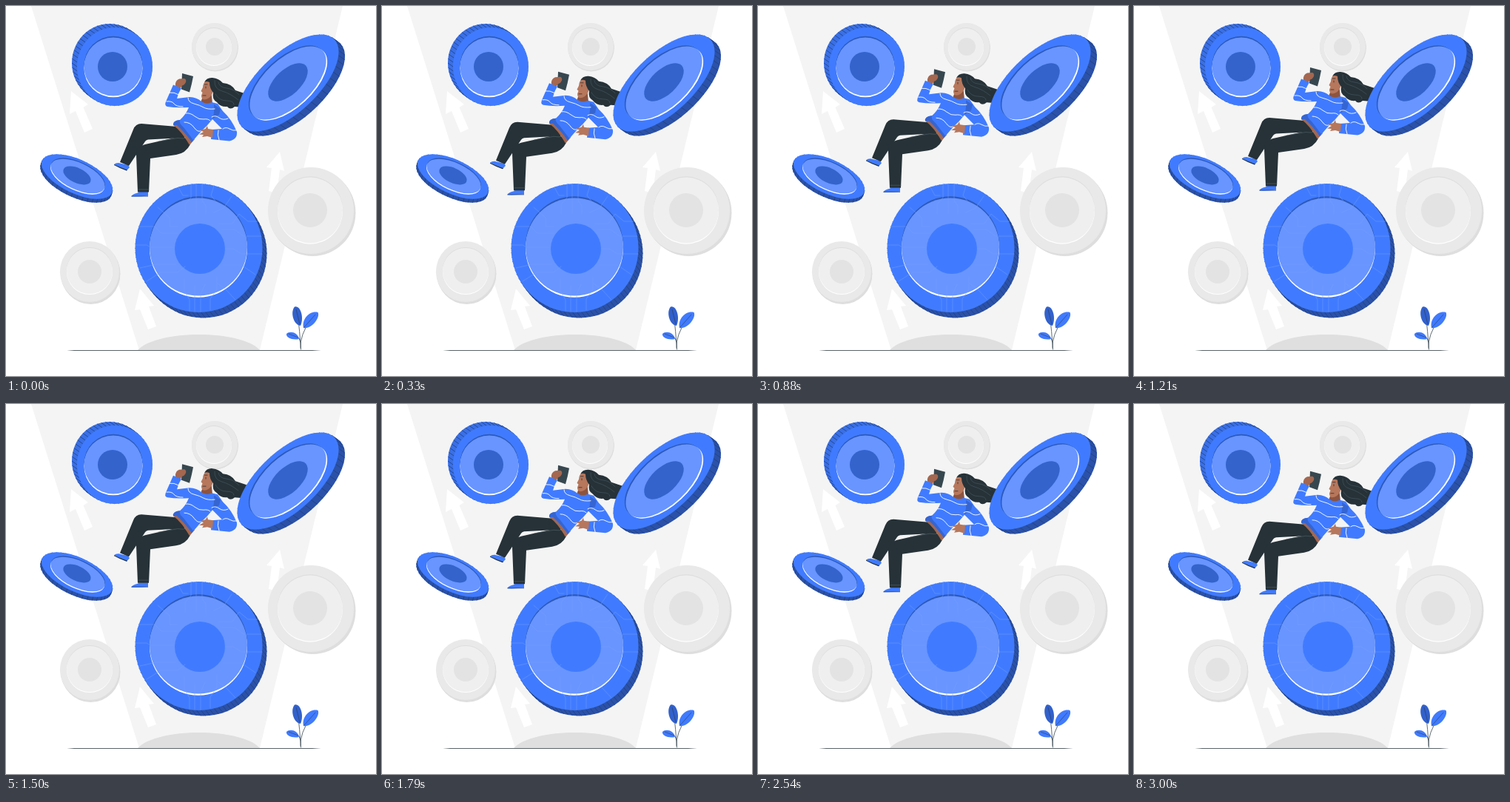
An HTML page that plays this animation: 500 by 500 pixels, repeating every 3.04 s.

```html
<!DOCTYPE html>
<html>
<head>
<meta charset="utf-8">
<style>
html, body { margin: 0; width: 100%; height: 100%; overflow: hidden; background: #fff; }
svg { display: block; width: 100vw; height: 100vh; }
.line { fill: none; stroke-linecap: round; stroke-linejoin: round; }
</style>
</head>
<body>
<svg viewBox="0 0 500 500">
  <path d="M34 0H455L343 465H180Z" fill="#f4f4f4"/>
  <path d="M178 465C204 437 318 437 343 465Z" fill="#dfdfdf"/>
  <g fill="#fff">
    <path d="M88 115L111 133L104.500 137L117 166L106 171L94 142L86 146Z"/>
    <path d="M370 197L376 223L370 221L366 253L355 250L359 219L352 218Z"/>
    <path d="M181 382L200 405L193 406L203 433L192 437L181 410L174 411Z"/>
  </g>
  <path d="M82 465.300L92 464.950H414L426 465.300L414 465.650H92Z" fill="#263238"/>

  <g id="plant">
    <path class="line" d="M398.500 464Q397 440 394 414M398 462Q397 445 411 425M398 454Q396 444 384 444" stroke="#37474f" stroke-width=".8"/>
    <path d="M398 432C388 431 384 413 390 406.500C398 404 403 421 398 432Z" fill="#3261cc"/>
    <path d="M402 435C399 423 411 411 421.500 414C425 421 413 437 402 435Z" fill="#407bff"/>
    <path d="M396 450C387 452 378 448 379 443C383 439 394 440 396 450Z" fill="#407bff"/>
    <path class="line" d="M397 430L392 410M403 434L418 417M395 448L382 443" stroke="#263238" stroke-width=".5"/>
  </g>

  <g id="back"></g>

  <g id="woman">
    <path d="M165 215L152 212Q148 212 146 214Q154 219 163 222.500L167 218Z" fill="#407bff"/>
    <path d="M146 214Q154 218 164 221.500L163 222.500Q153 219 146 215Z" fill="#263238"/>
    <path d="M180 251H192V256.500Q181 258 169.500 257.500Q170 254.500 178 252.500Z" fill="#407bff"/>
    <path d="M169.500 256.500H192V257.500H169.500Z" fill="#2a4f9f"/>
    <path d="M231 163L183 159Q175 159 172 167L154 211L166 216L188 183Q189 181 192 180.500L240 178L246 172Z" fill="#263238"/>
    <path d="M225 163Q238 172 249 187Q243 199 230 201L195 206L193 251.500H178L176 201Q176 190 188 187L228 178Z" fill="#263238"/>
    <path class="line" d="M206 183L232 178.500Q240 180 244 178M179 248H193" stroke="#54646b" stroke-width=".6"/>
    <path d="M226 161Q238 170 248 188L255 180L234 156Z" fill="#a4674f"/>
    <path d="M238 91L253 95Q251 106 248 116.500L237 112.500Z" fill="#37474f"/>
    <path d="M229 108Q228 101 234 98.500L241 98Q244 99 243 103Q241 107 238 107.500L235 112Z" fill="#a4674f"/>
    <path d="M277 112L279 132Q272 136 263 130L267 120Z" fill="#8d543f"/>
    <path d="M226 106.500L237 111Q233 117 231 125L248 123Q258 123.500 264 129Q271 134 278 130L286 132L293 142Q305 153 312 170Q313 180 302 182.500L277 180L278 167L292 166L279 153Q272 162 264 169L251 184Q242 171 231 161L226 161Q225 155 235 154Q243 147 247 137Q230 138 218 136Q213 135 217 127Z" fill="#407bff"/>
    <path d="M226 161Q225 155 235 154Q233 158 240 164L253 181L251 184Q242 171 231 161Z" fill="#3565d2"/>
    <path d="M281 133L290 139L288 147Q284 148 279 153Q282 143 281 133Z" fill="#3565d2"/>
    <path d="M280 167L273 166L272 162L269.500 166L262 168L267 170L261 173.500L267 174L265 177L272 176L279 178Z" fill="#b6775c"/>
    <g class="line" stroke="#fff" stroke-width=".9">
      <path d="M220 117Q227 116 234 120"/>
      <path d="M217 129Q224 128 227 132T239 136"/>
      <path d="M246 124Q246 130 254 132T267 137T282 139"/>
      <path d="M243 145Q249 144 255 149T267 153T276 155"/>
      <path d="M241 157Q249 157 254 164T263 169"/>
      <path d="M278 150Q283 147 288 151T300 152"/>
      <path d="M293 166Q297 163 302 166T311 168"/>
      <path d="M287 168Q285 174 288 181"/>
    </g>
    <path d="M273 99Q266 103 266 110L263.500 115L265.500 117L264 121Q264 126 268 126.500Q274 126 278 120L283 108L279 99Z" fill="#b6775c"/>
    <path class="line" d="M270 109V111M268.500 106L272 106M266 121L270 121" stroke="#263238" stroke-width=".8"/>
    <path d="M268 103Q271 96.500 279 97Q288 98 293 104Q305 105 310 114L325 119L321 137L309 136Q303 141 299 136Q290 137 285 130Q278 126 280 117Q275 111 275 103Q271 101 268 103Z" fill="#263238"/>
    <path class="line" d="M282 101Q281 112 292 115T314 127M287 103Q288 110 298 111T315 120M283 119Q288 128 298 128T308 133" stroke="#53636a" stroke-width=".5"/>
  </g>

  <g id="front"></g>
  <g class="line" stroke="#79a2ff" stroke-width=".7" opacity=".65">
    <path d="M250 240V259L242 268V282M257 240V280M265 240V263L270 270V282M233 245L239 256H246M281 243L277 256L285 266"/>
    <path d="M179 298H201L210 307H231M175 323H190L195 326H226M181 354L203 349H229M190 372L209 360H232L242 352"/>
    <path d="M345 311H321L309 302H291M341 291H327L315 281L306 294H288M346 335H318L307 328H296M337 363L318 350H294"/>
    <path d="M248 412V397L241 385V369M255 413V378M263 413V389L269 376M276 411V396L285 383V366M310 397L297 383L286 375"/>
    <path d="M205 272L221 286V298H231M305 257L294 273L281 279"/>
  </g>
</svg>
<script>
const $ = id => document.getElementById(id);

const ellipse = (x, y, a, b, rot, fill) =>
  `<ellipse rx="${a}" ry="${b}" transform="translate(${x} ${y}) rotate(${rot})" fill="${fill}"/>`;

// face: [x, y, rx, ry, angle]; side: rim offset; inner: recessed disc;
// lip: offset of the recess shadow and highlight; mark: plain emblem disc
function coin({ face, side, inner, lip, mark, tone, ticks }) {
  const [x, y, a, b, rot] = face, [dx, dy] = side, [lx, ly] = lip;
  let s = '';
  for (const k of [1, .75, .5, .25]) s += ellipse(x + dx * k, y + dy * k, a, b, rot, tone.side);
  if (ticks) {
    const r = rot * Math.PI / 180;
    let d = '';
    for (let i = 0; i < ticks; i++) {
      const q = i * 2 * Math.PI / ticks, u = a * Math.cos(q), v = b * Math.sin(q);
      const px = x + u * Math.cos(r) - v * Math.sin(r);
      const py = y + u * Math.sin(r) + v * Math.cos(r);
      d += `M${px.toFixed(1)} ${py.toFixed(1)}l${dx} ${dy}`;
    }
    s += `<path d="${d}" stroke="${tone.tick}" stroke-width=".8"/>`;
  }
  const [ix, iy, ia, ib, ir] = inner;
  return s + ellipse(...face, tone.face)
    + ellipse(ix - lx, iy - ly, ia, ib, ir, tone.shade)
    + ellipse(ix + lx, iy + ly, ia, ib, ir, '#fff')
    + ellipse(ix, iy, ia, ib, ir, tone.inner)
    + ellipse(...mark, tone.mark);
}

const grey = { side: '#dedede', face: '#e9e9e9', shade: '#dedede', inner: '#efefef', mark: '#e3e3e3' };
const blue = { side: '#2b52a8', tick: '#203f82', face: '#407bff', shade: '#2d59b8', inner: '#6895ff', mark: '#3463cc' };

$('back').innerHTML = [
  { face: [282, 55, 31, 32, 0], side: [.8, 1.5], inner: [281, 55, 24, 25, 0], lip: [0, 1], mark: [282, 55, 12, 12, 0], tone: grey },
  { face: [412, 276.5, 58, 58.5, 0], side: [2.5, 3], inner: [411, 276, 44, 44.5, 0], lip: [0, 1.2], mark: [411, 276, 23, 23, 0], tone: grey },
  { face: [113, 359, 40, 41, 0], side: [1.5, 3], inner: [113, 358, 31, 31, 0], lip: [0, 1], mark: [113, 359, 16, 16, 0], tone: grey }
].map(coin).join('');

$('front').innerHTML = [
  { face: [147, 82, 51, 53, 0], side: [-7, -5], inner: [145, 82, 39.5, 39.5, 0], lip: [0, 1.8], mark: [144, 82, 20, 20, 0],
    tone: { ...blue, side: '#3a70e6' }, ticks: 56 },
  { face: [381, 104, 86, 40, -43], side: [8.5, 6], inner: [381, 104, 64, 32, -43], lip: [1.5, 1.2], mark: [381, 103, 33, 17, -43], tone: blue, ticks: 50 },
  { face: [96, 230.5, 52, 23, 25], side: [-1.5, 5], inner: [97, 230, 39.5, 18, 25], lip: [-.4, 1.3], mark: [96, 229, 20, 10, 25], tone: blue, ticks: 42 },
  { face: [260.5, 327, 86, 87, 0], side: [6, 7.5], inner: [260, 325.5, 66, 66, 0], lip: [0, 2.2], mark: [262, 328, 34, 34, 0],
    tone: { ...blue, mark: '#407bff' }, ticks: 90 }
].map(coin).join('');

// Steady rise and fall
const LOOP = 3040, RISE = 10;
function draw() {
  const p = performance.now() % LOOP / LOOP;
  const y = -RISE * (1 - Math.abs(1 - 2 * p));
  $('woman').setAttribute('transform', `translate(0 ${y.toFixed(3)})`);
  requestAnimationFrame(draw);
}
draw();
</script>
</body>
</html>
```
